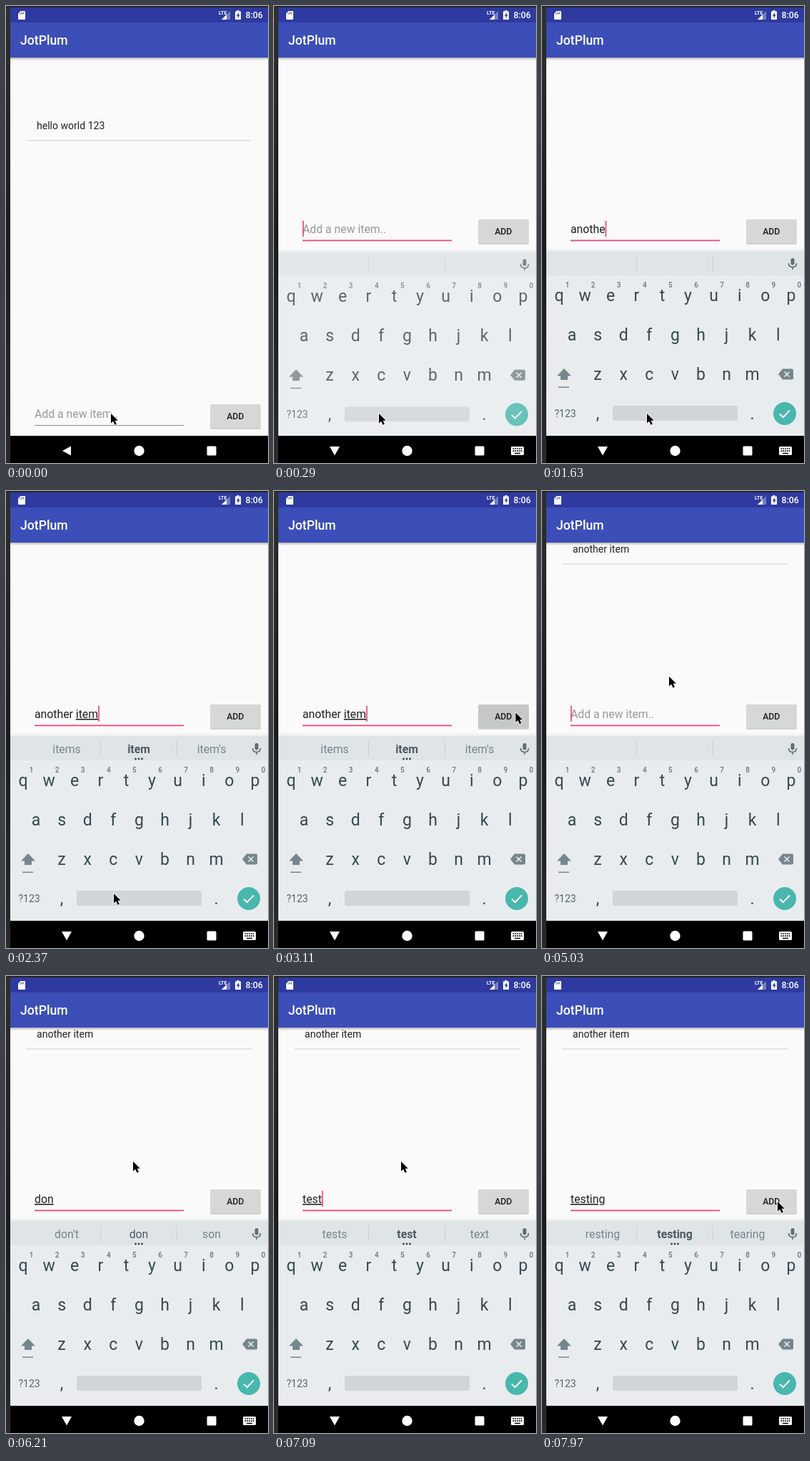
Recreate the animation shown at these times as an HTML page. Size 367x638 px, loop 8000 ms.

```html
<!DOCTYPE html>
<html lang="en">
<head>
<meta charset="utf-8">
<style>
  html, body { margin: 0; width: 100%; height: 100%; overflow: hidden; background: #fafafa; }
  svg { display: block; width: 100%; height: 100%; font-family: Roboto, sans-serif; }
  text { white-space: pre; }
  .mid { text-anchor: middle; }
  #letters { font-size: 23px; fill: #37474f; }
  #letters .digit { font-size: 10px; font-weight: 500; fill: #65747b; }
  #words { font-size: 15.8px; fill: #77858c; }
  .composing { text-decoration: underline; text-decoration-thickness: 1px; text-underline-offset: 2px; }
</style>
</head>
<body>
<svg viewBox="0 0 367 638">
  <defs>
    <linearGradient id="shade" x2="0" y2="1">
      <stop stop-color="#000" stop-opacity=".28"/><stop offset="1" stop-color="#000" stop-opacity="0"/>
    </linearGradient>
    <linearGradient id="desk" x2="0" y2="1">
      <stop stop-color="#303030"/><stop offset=".5" stop-color="#1c1c1c"/><stop offset="1" stop-color="#2a2a2a"/>
    </linearGradient>
  </defs>
  <rect width="367" height="638" fill="#fafafa"/>

  <g font-size="14.05" fill="#212121" stroke="none">
    <g id="firstItem"><text x="43" y="172">hello world 123</text><rect x="29" y="187" width="315" height="1.5" fill="#dedede"/></g>
    <g id="secondItem"><text x="43" y="86">another item</text><rect x="29" y="101" width="315" height="1.5" fill="#dedede"/></g>
  </g>

  <g id="form">
    <text id="hint" x="40" y="575" font-size="15.8" fill="#999">Add a new item..</text>
    <text id="entry" x="40" y="575" font-size="15.8" fill="#212121"><tspan id="plain"></tspan><tspan id="composing" class="composing"></tspan></text>
    <rect id="line" x="40" width="209"/>
    <rect id="caret" y="558" width="1.7" height="22" fill="#f0437e"/>
    <rect x="286" y="557" width="71" height="34" rx="2" fill="#000" opacity=".17"/>
    <rect id="button" x="286" y="556" width="71" height="33" rx="2"/>
    <text class="mid" x="321.3" y="576.7" font-size="12.3" font-weight="500" fill="#1e1e1e">ADD</text>
  </g>

  <rect y="72" width="367" height="4" fill="url(#shade)"/>
  <rect y="23" width="367" height="49" fill="#3c4eb7"/>
  <rect y="2" width="367" height="21" fill="#2e3a9f"/>
  <text x="20" y="54" font-size="17.6" font-weight="500" fill="#fff">JotPlum</text>
  <g fill="#fff">
    <path d="M20.5 7H26q1 0 1 1V18q0 1-1 1H18q-1 0-1-1V10.5z"/>
    <path d="M19.8 9.8v2M22 8.5v3M24.2 8.5v3" stroke="#2e3a9f"/>
    <path d="M314 7V19H302z" opacity=".35"/><path d="M309 12V19H302z"/>
    <text x="298" y="12" font-size="7" font-weight="700">LTE</text>
    <path d="M323.5 7.5V6h3v1.5H329V19H321V7.500z"/>
    <path d="M326 9l-3.200 4.800h1.900v3.500l3-5h-1.900z" fill="#2e3a9f"/>
    <text x="335.500" y="17.200" font-size="12.3" font-weight="500">8:06</text>
  </g>

  <g id="keyboard">
    <rect x="6" y="339" width="361" height="4" fill="#000" opacity=".04"/>
    <rect x="6" y="342" width="361" height="290" fill="#e8ecef"/>
    <rect x="6" y="342" width="361" height="34" fill="#dfe4e7"/>
    <path d="M132.500 349v22M239.500 349v22" stroke="#c8cfd3"/>
    <g id="words" class="mid">
      <text x="85" y="366"></text><text x="186" y="366" fill="#4b5a61"></text><text x="288" y="366"></text>
      <g id="dots" fill="#37474f"><circle cx="181.500" cy="374" r="1.4"/><circle cx="186" cy="374" r="1.4"/><circle cx="190.500" cy="374" r="1.4"/></g>
    </g>
    <g fill="none" stroke="#5f6e75" stroke-width="1.6">
      <rect x="348.500" y="352" width="5" height="9.500" rx="2.500" fill="#5f6e75" stroke="none"/>
      <path d="M345.500 359q0 5.500 5.500 5.500t5.500-5.500M351 364.500V368"/>
    </g>
    <g id="letters"></g>
    <path d="M31 506L41 516.500H36V522H26V516.500H21z" fill="#77868d"/>
    <rect x="23" y="531.500" width="15" height="1.500" fill="#77868d"/>
    <path d="M337 506.500H350q2 0 2 2V519.500q0 2-2 2H337L331 514z" fill="#77868d"/>
    <path d="M339.500 510.500l7 7m0-7l-7 7" stroke="#e8ecef" stroke-width="1.6"/>
    <rect x="99" y="558" width="175" height="21" rx="3" fill="#d0d5d8"/>
    <text x="17.500" y="574" font-size="14" fill="#55646b">?123</text>
    <g class="mid" font-size="23" fill="#37474f"><text x="78" y="577">,</text><text x="294.500" y="577">.</text></g>
    <circle cx="340" cy="569" r="16" fill="#49b7ad"/>
    <path d="M333 569.500l4.700 4.700 9.300-9.700" fill="none" stroke="#fff" stroke-width="1.900"/>
  </g>

  <rect x="6" y="600" width="361" height="38"/>
  <g fill="#fff">
    <path id="back"/>
    <circle cx="186.500" cy="621" r="7.200"/>
    <rect x="281.500" y="614.500" width="13" height="13" rx="1.500"/>
    <g id="switcher">
      <rect x="332" y="615" width="18" height="12" rx="1.500"/>
      <path d="M334.500 618h13M334.500 621.200h13" stroke="#000" stroke-width="1.700" stroke-dasharray="1.700 1.100"/>
      <path d="M337 624.500h8" stroke="#000" stroke-width="1.500"/>
    </g>
  </g>
  <rect width="6" height="638" fill="url(#desk)"/>
  <rect width="367" height="2" fill="#252525"/>
  <path id="pointer" d="M0 0V13.500L3.200 10.700 5.500 15.700 7.900 14.700 5.700 9.700H9.800z" stroke="#fff" stroke-width="1.600" paint-order="stroke"/>
</svg>

<script>
const $ = id => document.getElementById(id);
const LOOP = 8000, TICK = 147.7;

// [tick, settled text, text being composed, suggestions, weight of the middle one]
const typing = [
  [0, '', ''], [8, 'a', ''], [9, 'an', ''], [10, 'anot', ''], [11, 'anothe', ''],
  [12, '', 'another', ["another's", 'another', 'others'], 700],
  [13, 'another ', ''], [14, 'another ', 'i'],
  [15, 'another ', 'it', ['its', 'it', "it's"], 400],
  [16, 'another ', 'item', ['items', 'item', "item's"], 700],
  [22, '', ''], [36, 'd', ''], [37, 'do', ''], [38, '', 'don'],
  [39, '', 'don', ["don't", 'don', 'son'], 400],
  [44, '', 'd', ["don't", 'don', 'son'], 400],
  [45, '', '', ["don't", 'don', 'son'], 400],
  [46, '', 't', ["don't", 'don', 'son'], 400],
  [47, '', 'te', ['the', 'te', 'tell'], 400],
  [48, '', 'test', ['tests', 'test', 'text'], 700],
  [49, '', 'testin', ['resting', 'testing', 'tearing'], 700],
  [50, '', 'testing', ['resting', 'testing', 'tearing'], 700]
];
const caretOff = [[0, 1], [4, 8], [25, 28], [31, 34], [42, 44], [54, 99]];
// [tick, x, y]
const pointerPath = [
  [0, 147, 569], [15, 147, 569], [16, 151, 562], [20, 336, 312], [22, 341, 307],
  [24, 341, 307], [26, 339, 305], [27, 339, 305], [30, 262, 136], [34, 178, 259],
  [49, 178, 259], [51, 250, 298], [52, 300, 306], [54, 330, 315], [99, 330, 315]
];

function addKeys(keys, left, baseline) {
  [...keys].forEach((key, i) => {
    const x = left + i * 36.1;
    $('letters').innerHTML += `<text class="mid" x="${x}" y="${baseline}">${key}</text>` +
      (baseline < 420 ? `<text class="mid digit" x="${x + 11.5}" y="393">${(i + 1) % 10}</text>` : '');
  });
}
addKeys('qwertyuiop', 24, 412);
addKeys('asdfghjkl', 42, 467);
addKeys('zxcvbnm', 78, 522);

function show(id, visible) { $(id).style.display = visible ? '' : 'none'; }
function set(id, attributes) {
  for (const name in attributes) $(id).setAttribute(name, attributes[name]);
}

function pointerAt(tick) {
  const next = pointerPath.findIndex(point => point[0] > tick);
  const [t0, x0, y0] = pointerPath[next - 1], [t1, x1, y1] = pointerPath[next];
  const k = (tick - t0) / (t1 - t0);
  return [x0 + (x1 - x0) * k, y0 + (y1 - y0) * k];
}

function draw(tick) {
  const focused = tick >= 1;
  const [, settled, composing, suggestions, weight] = typing.filter(step => step[0] <= tick).pop();

  show('firstItem', !focused);
  show('secondItem', tick >= 22);
  set('form', { transform: `translate(0 ${focused ? -258 : 0})` });
  set('line', focused ? { y: 584.5, height: 1.8, fill: '#ee4580' } : { y: 585, height: 1, fill: '#888' });
  set('button', { fill: tick === 21 ? '#c6c8c8' : '#d6d7d7' });

  $('plain').textContent = settled;
  $('composing').textContent = composing;
  show('hint', !settled && !composing);
  show('caret', !caretOff.some(([from, to]) => tick >= from && tick < to));
  set('caret', { x: 40 + (settled || composing ? $('entry').getComputedTextLength() : 0) });

  const words = $('words').querySelectorAll('text');
  words.forEach((word, i) => word.textContent = suggestions ? suggestions[i] : '');
  words[1].style.fontWeight = weight || 400;
  show('dots', suggestions);

  // The keyboard settles while it fades in.
  show('keyboard', focused);
  const [drop, opacity] = { 1: [20, .5], 2: [1.3, .82] }[tick] || [0, 1];
  set('keyboard', { transform: `translate(0 ${drop})`, opacity });
  set('back', { d: focused ? 'M78 615H92L85 627.5z' : 'M79 621L91 614.5V627.500z' });
  show('switcher', focused);
  set('pointer', { transform: `translate(${pointerAt(tick)})` });
}

function frame() {
  draw(Math.floor((performance.now() % LOOP + 10) / TICK));
  requestAnimationFrame(frame);
}
frame();
</script>
</body>
</html>
```
